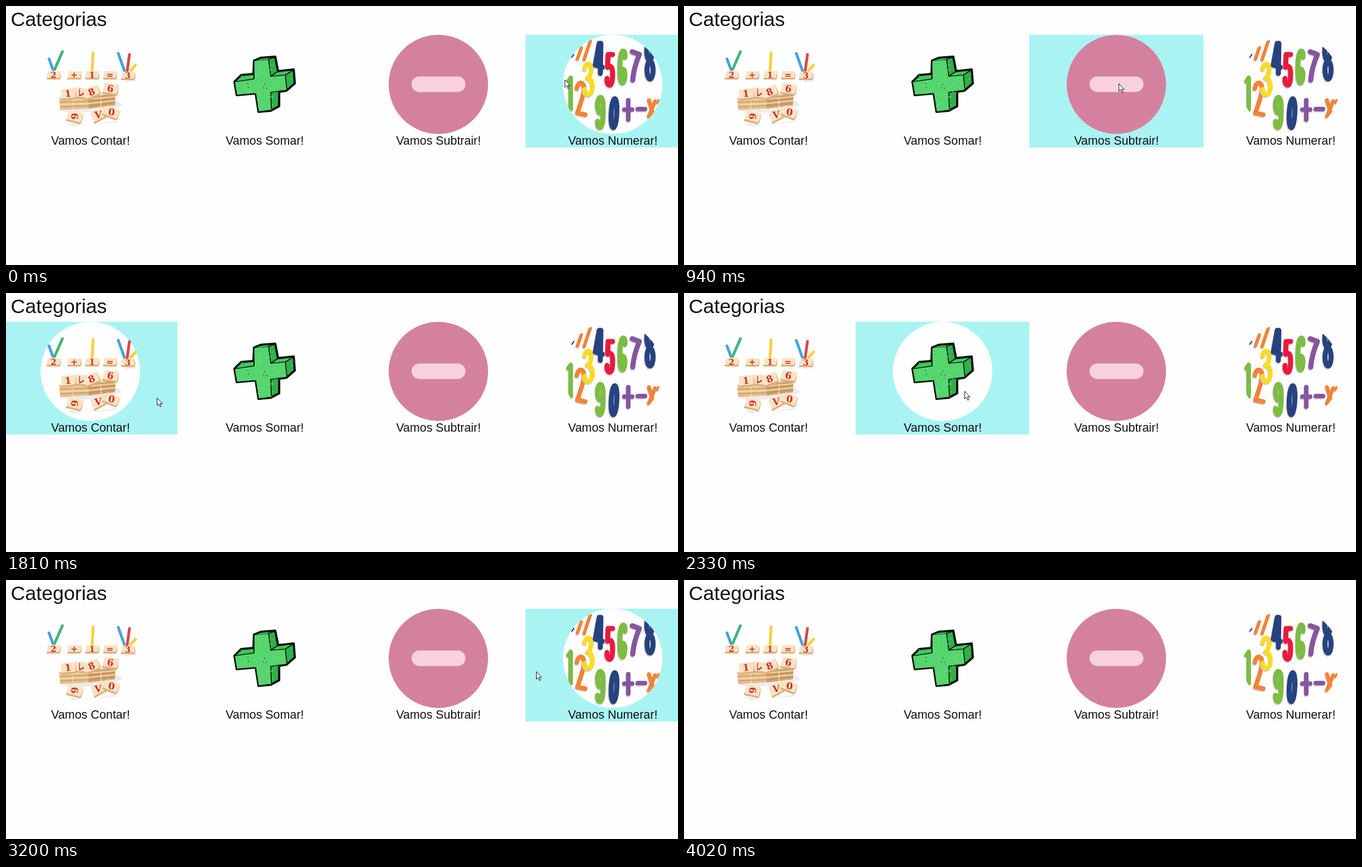
An HTML page that plays this animation: 1203x465 px, repeating every 4300 ms.

```html
<!DOCTYPE html>
<html lang="pt">
<head>
<meta charset="utf-8">
<title>Categorias</title>
<style>
  html, body { margin: 0; width: 100%; height: 100%; overflow: hidden; background: #fefefe; }
  svg { display: block; }
  text { font-family: "Liberation Sans", Arial, sans-serif; fill: #111; }
  .label { font-size: 21.4px; text-anchor: middle; }
  .tile text { font: bold 15px "DejaVu Serif", serif; fill: #d32b2b; text-anchor: middle; }
  .stroke { fill: none; stroke-linecap: round; stroke-linejoin: round; }
</style>
</head>
<body>
<svg width="1203" height="465" viewBox="0 0 1203 465">
  <defs>
    <clipPath id="round"><circle cx="1086" cy="141" r="89"/></clipPath>
    <clipPath id="block"><path d="M444 98L456 93L482 91L487 117L515 114L517 139L502 152L489 154L489 180L474 188L452 190L447 157L413 160L409 136L421 124L443 122Z"/></clipPath>
  </defs>
  <text x="8.6" y="36" font-size="35.6">Categorias</text>
  <g id="cards"></g>

  <g id="counting">
    <path fill="#ececec" d="M99 187L150 184L200 170L208 178L178 190L112 192ZM107 209L140 214L180 209L197 206L200 209L166 212L120 216ZM228 118L233 124V135L212 137Z"/>
    <g id="sticks" class="stroke" stroke-width="5"></g>
    <path fill="#e6be8b" d="M95 165L150 162L196 156L195 178L148 184L97 187Z"/>
    <path fill="#cfa06b" d="M148 165L196 157L195 178L148 184Z"/>
    <path class="stroke" stroke="#f4d9ae" stroke-width="2" d="M96 169L148 167L195 163M97 177L148 175L195 170M120 169V185M170 165V181"/>
    <path class="stroke" stroke="#b98a58" d="M96 173L148 171L195 166M97 181L148 179L195 174"/>
    <g id="tiles"></g>
  </g>

  <g stroke="#071008" stroke-linejoin="round">
    <path fill="#30ae4a" stroke-width="4" d="M444 98L456 93L482 91L487 117L515 114L517 139L502 152L489 154L489 180L474 188L452 190L447 157L413 160L409 136L421 124L443 122Z"/>
    <path fill="#55d56d" stroke-width="1.6" d="M444 98L470 96L474 126L500 124L503 151L474 155L475 187L452 190L447 157L413 160L409 136L444 131Z"/>
    <path fill="#42c65a" stroke="none" d="M447 98L457 95L480 93L471 96ZM412 135L422 126L443 124V130ZM476 125L488 119L513 116L500 123Z"/>
    <g id="speckles" stroke="none" fill="#83e497" clip-path="url(#block)"></g>
    <path class="stroke" stroke-width="1.6" d="M470 96L481 92M474 126L487 117M500 124L514 115M444 131V122M433 139h.1M434 146h.1M463 141h.1M466 148h.1M461 147h.1"/>
  </g>

  <circle cx="774" cy="140.7" r="89" fill="#d481a0"/>
  <rect x="726" y="126.4" width="96.5" height="28" rx="14" fill="#f8d1de"/>

  <g id="numbers" class="stroke" clip-path="url(#round)"></g>
  <path id="cursor" d="M.5 .5V14L3.5 11.2L6 16.5L8 15.5L5.7 10.5H10Z" fill="#fff" stroke="#111"/>
</svg>
<script>
const $ = id => document.getElementById(id);
const draw = (id, markup) => { $(id).innerHTML = markup; };

const labels = ['Contar', 'Somar', 'Subtrair', 'Numerar'];
draw('cards', labels.map((label, i) => {
  const left = [0, 307, 618, 930][i], right = [307, 618, 930, 1242][i];
  const center = [151, 463, 774, 1086][i];
  return `<rect class="hover" x="${left}" y="51.6" width="${right - left}" height="202.4" fill="#a9f4f2"/>
    <circle cx="${center}" cy="140.7" r="89" fill="#fefefe"/>
    <text class="label" x="${center + .3}" y="249">Vamos ${label}!</text>`;
}).join(''));

const blue = '#47a1df', green = '#43b57c', yellow = '#f5d13c', red = '#dd4745';
draw('sticks', [
  [blue, 'M77 95L84 114'], [green, 'M101 82L87 114'], [yellow, 'M156 84L154 117'],
  [blue, 'M201 85L212 116'], [red, 'M221 87L217 116'], [yellow, 'M232 106L223 116']
].map(([color, d]) => `<path stroke="${color}" d="${d}"/>`).join(''));

// symbol, center x, center y, tile angle, symbol angle
const tiles = [
  ['2', 85, 123, 0, 0], ['+', 122, 123, 0, 0], ['1', 154, 123, 0, 0],
  ['=', 186, 123, 0, 0], ['3', 218, 124, 0, 0],
  ['7', 133, 155, 5, 150], ['1', 111, 157, -6, 0], ['8', 153, 154, -22, 0],
  ['6', 187, 148, 8, 0], ['6', 123, 198, 14, 80], ['V', 165, 195, -28, 20], ['0', 189, 190, 22, -15]
];
draw('tiles', tiles.map(([symbol, x, y, angle, turn], i) => {
  const h = i < 5 ? 6 : 7.5, scale = i < 5 ? 1 : 1.12;
  return `<g class="tile" transform="translate(${x} ${y}) rotate(${angle}) scale(${scale})">
    <path fill="#d9b07c" d="M-12 ${h - 1}H11L13 ${-h}V${h}L11 ${h + 3}H-12Z"/>
    <path fill="#f8e4c3" d="M-10 ${-h}H13L11 ${h}H-12Z"/>
    <text y="5.5" transform="rotate(${turn})">${symbol}</text></g>`;
}).join(''));

let seed = 7;
const random = () => (seed = seed * 16807 % 2147483647) / 2147483647;
draw('speckles', Array.from({ length: 200 }, () =>
  `<circle cx="${408 + 110 * random()}" cy="${92 + 98 * random()}" r="${.4 + random()}" opacity=".55"/>`
).join(''));

const oval = (x, y, rx, ry) => `M${x - rx} ${y}a${rx} ${ry} 0 1 1 ${2 * rx} 0a${rx} ${ry} 0 1 1 ${-2 * rx} 0`;
const lime = '#7cbd42', orange = '#f38335', navy = '#27437f', purple = '#8755a0';
const numbers = [
  [orange, 'M1023 95L1030 75M1035 96L1046 63', 6],
  [navy, 'M1013 91L1016 87', 3],
  [lime, 'M1007 135L1011 129V185', 8],
  [orange, 'M1022 148Q1024 137 1030 138Q1037 141 1034 156Q1032 166 1023 192L1037 195', 8],
  ['#fbdc20', 'M1036 113Q1037 104 1044 104Q1050 108 1047 120Q1045 129 1041 129Q1050 131 1050 146Q1049 158 1042 159Q1036 157 1036 149', 8],
  [navy, 'M1062 67L1055 106L1068 110M1065 67L1064 121', 9],
  ['#e91b3c', 'M1086 87H1078L1077 110Q1086 104 1086 122Q1086 143 1080 142Q1075 140 1076 130', 9],
  [lime, 'M1108 92Q1109 80 1104 81Q1099 84 1099 115Q1099 138 1104 138Q1108 136 1108 122Q1107 110 1100 114', 9],
  [purple, 'M1121 82L1134 87Q1124 110 1122 133', 9],
  [navy, oval(1152, 82, 5, 15) + oval(1153, 115, 5.5, 16), 9],
  [lime, oval(1064, 178, 5, 14) + 'M1069 178Q1070 218 1063 218Q1059 217 1059 207', 9],
  [navy, oval(0, 0, 5, 26), 9, 'translate(1088.5 192.5) rotate(3)'],
  [purple, 'M1114 169V204M1107 186H1121M1131 185H1144', 8],
  [orange, 'M1151 169L1160 198M1162 171L1151 198', 7],
  [orange, 'M1168 169L1166 174', 4]
];
draw('numbers', numbers.map(([color, d, width, place = '']) =>
  `<path d="${d}" stroke="#c9c7c9" stroke-width="${width}" transform="translate(-1 2) ${place}"/>
   <path d="${d}" stroke="${color}" stroke-width="${width}" transform="${place}"/>`
).join(''));

// start time, hovered card, cursor x, cursor y
const steps = [
  [0, 3, 1000, 132], [150, 3, 1002, 132], [800, 3, 900, 150], [940, 2, 778, 139],
  [1220, 1, 550, 167], [1360, 1, 513, 175], [1510, 1, 496, 180],
  [1670, 0, 294, 180], [1810, 0, 270, 188], [2210, 1, 420, 183], [2330, 1, 502, 176],
  [2760, 2, 690, 178], [2890, 2, 778, 174], [3200, 3, 949, 164],
  [3630, -1, 1111, 380], [3770, -1, 1123, 415], [3890, -1, 1135, 448], [4020, -1, 1135, 500]
];
const hovers = document.querySelectorAll('.hover');

function render(now) {
  const time = now % 4300;
  const [, active, x, y] = steps.findLast(step => step[0] <= time);
  hovers.forEach((rect, i) => rect.setAttribute('visibility', i === active ? 'visible' : 'hidden'));
  $('cursor').setAttribute('transform', `translate(${x} ${y})`);
}

const start = performance.now();
function tick() {
  render(performance.now() - start);
  requestAnimationFrame(tick);
}
tick();
</script>
</body>
</html>
```
